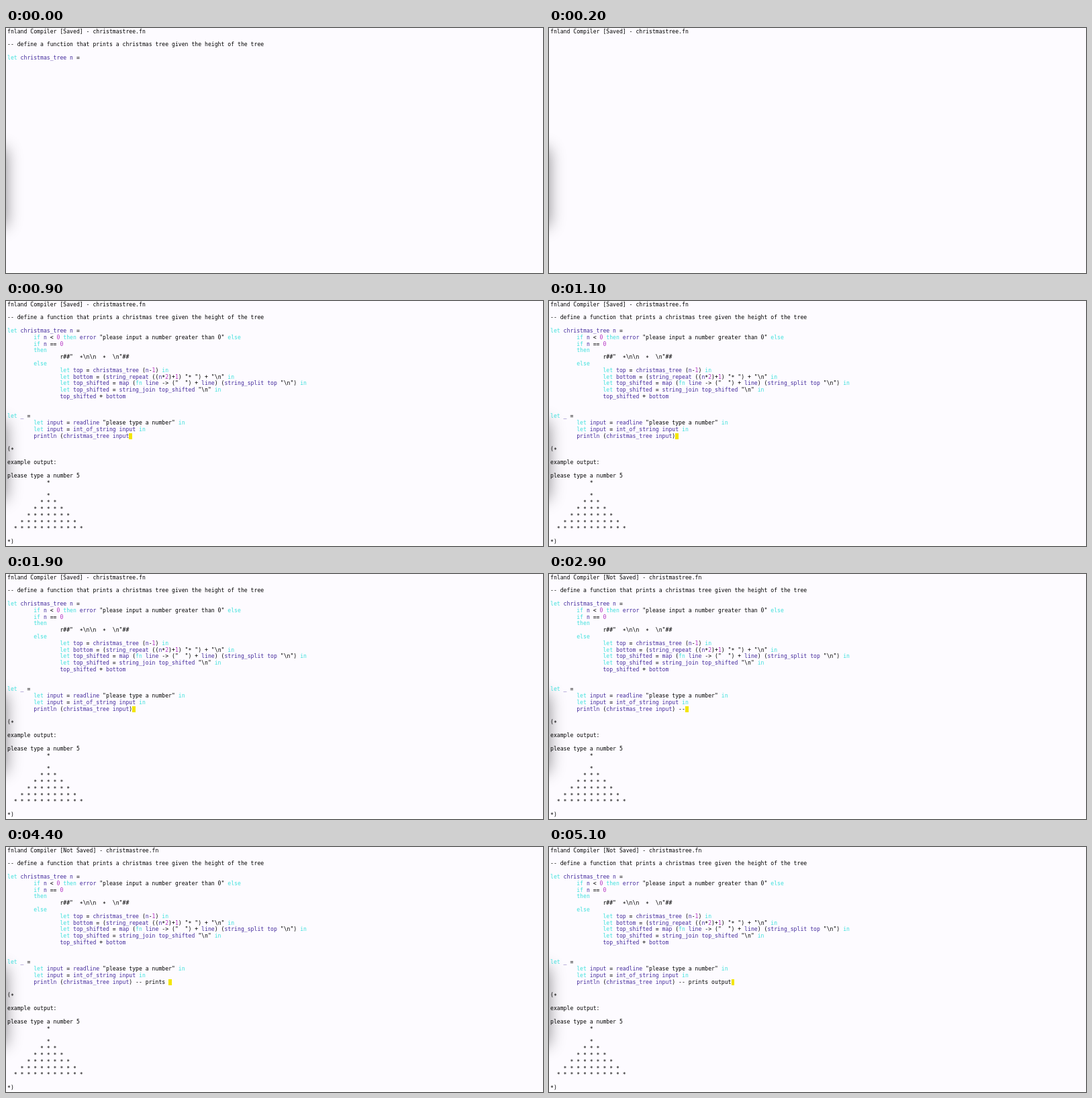
Recreate the animation shown at these times as an HTML page. Size 800 by 365 pixels, loop 5.3 s.

```html
<!DOCTYPE html>
<html lang="en">
<head>
<meta charset="utf-8">
<title>fnland Compiler</title>
<style>
  html, body { margin: 0; width: 100%; height: 100%; overflow: hidden; background: #fff; }
  #stage { position: absolute; left: 0; top: 0; width: 800px; height: 365px; overflow: hidden; }
  #paper { position: absolute; left: 0; top: 0; width: 800px; height: 363px; background: #fdfbff; }
  #shadow {
    position: absolute; left: -100px; top: 180px; width: 100px; height: 115px;
    box-shadow: 0 0 22px rgba(0, 0, 0, .45);
  }
  /* Laid out ten times larger so that the fractional character pitch stays exact. */
  #screen {
    position: absolute; left: 2.1px; top: 0; margin: 0;
    font: 81.4px/98px "DejaVu Sans Mono", monospace;
    font-variant-ligatures: none; color: #000; white-space: pre;
    transform: scale(.1); transform-origin: 0 0;
  }
  .key { color: #3fe0dc; }
  .num { color: #b32fc0; }
  .id { color: #432a9c; }
  .star { position: relative; top: .17em; }
  #cursor { position: absolute; top: 196.8px; width: 4.9px; height: 9.6px; background: #f3e600; }
</style>
</head>
<body>
<div id="stage">
  <div id="paper"></div>
  <div id="shadow"></div>
  <pre id="screen"></pre>
  <div id="cursor"></div>
</div>
<script>
  const LOOP = 5300, STEP = 100, CELL = 4.9, LEFT = 2.1;
  const screen = document.getElementById('screen');
  const cursor = document.getElementById('cursor');

  const program = String.raw`
-- define a function that prints a christmas tree given the height of the tree

let christmas_tree n =
        if n < 0 then error "please input a number greater than 0" else
        if n == 0
        then
                r##"  *\n\n  *  \n"##
        else
                let top = christmas_tree (n-1) in
                let bottom = (string_repeat ((n*2)+1) "* ") + "\n" in
                let top_shifted = map (fn line -> ("  ") + line) (string_split top "\n") in
                let top_shifted = string_join top_shifted "\n" in
                top_shifted + bottom


let _ =
        let input = readline "please type a number" in
        let input = int_of_string input in
        println (christmas_tree input)`;

  const treeRow = n => ' '.repeat(13 - n) + Array(n).fill('*').join(' ');
  const example = ['', '(*', '', 'example output:', '', 'please type a number 5',
    treeRow(1), '', ...[1, 3, 5, 7, 9, 11].map(treeRow), '', '*)'].join('\n');

  const escape = s => s.replace(/&/g, '&amp;').replace(/</g, '&lt;').replace(/>/g, '&gt;');
  const stars = s => s.replace(/\*+/g, '<span class="star">$&</span>');
  const plain = s => stars(escape(s));

  const token = /(--.*|r##".*?"##|"[^"]*")|\b(let|if|then|else|in|fn)\b|(\d+)|([A-Za-z_]\w*)|([^\w"-]+|.)/g;
  const highlight = code => code.replace(token, (text, literal, key, num, id) => {
    const kind = key ? 'key' : num ? 'num' : id ? 'id' : '';
    return kind ? `<span class="${kind}">${text}</span>` : plain(text);
  });

  const typed = ' -- prints output';
  const keyTimes = [2600, 2800, 2900, 3100, 3300, 3400, 3500, 3600, 3700, 3800,
    4400, 4600, 4700, 4800, 4900, 5000, 5100];
  const lineEnd = 38;

  // Rows already painted while the terminal redraws itself.
  const partialRows = { 0: 4, 200: 0, 600: 4 };

  function draw(time) {
    const count = keyTimes.filter(t => t <= time).length;
    const title = `fnland Compiler [${count ? 'Not Saved' : 'Saved'}] - christmastree.fn\n`;
    const rows = partialRows[time];
    const partial = rows !== undefined;
    const code = program + typed.slice(0, count);

    screen.innerHTML = plain(title) + (partial
      ? highlight(code.split('\n').slice(0, rows).join('\n'))
      : highlight(code) + '\n' + plain(example));

    const column = Math.min(lineEnd, 28 + time / STEP) + count;
    cursor.style.left = LEFT + CELL * column + 'px';
    cursor.style.display = partial ? 'none' : 'block';
  }

  let shown = -1;
  function tick() {
    const time = Math.floor(performance.now() % LOOP / STEP) * STEP;
    if (time !== shown) draw(shown = time);
    requestAnimationFrame(tick);
  }
  tick();
</script>
</body>
</html>
```
